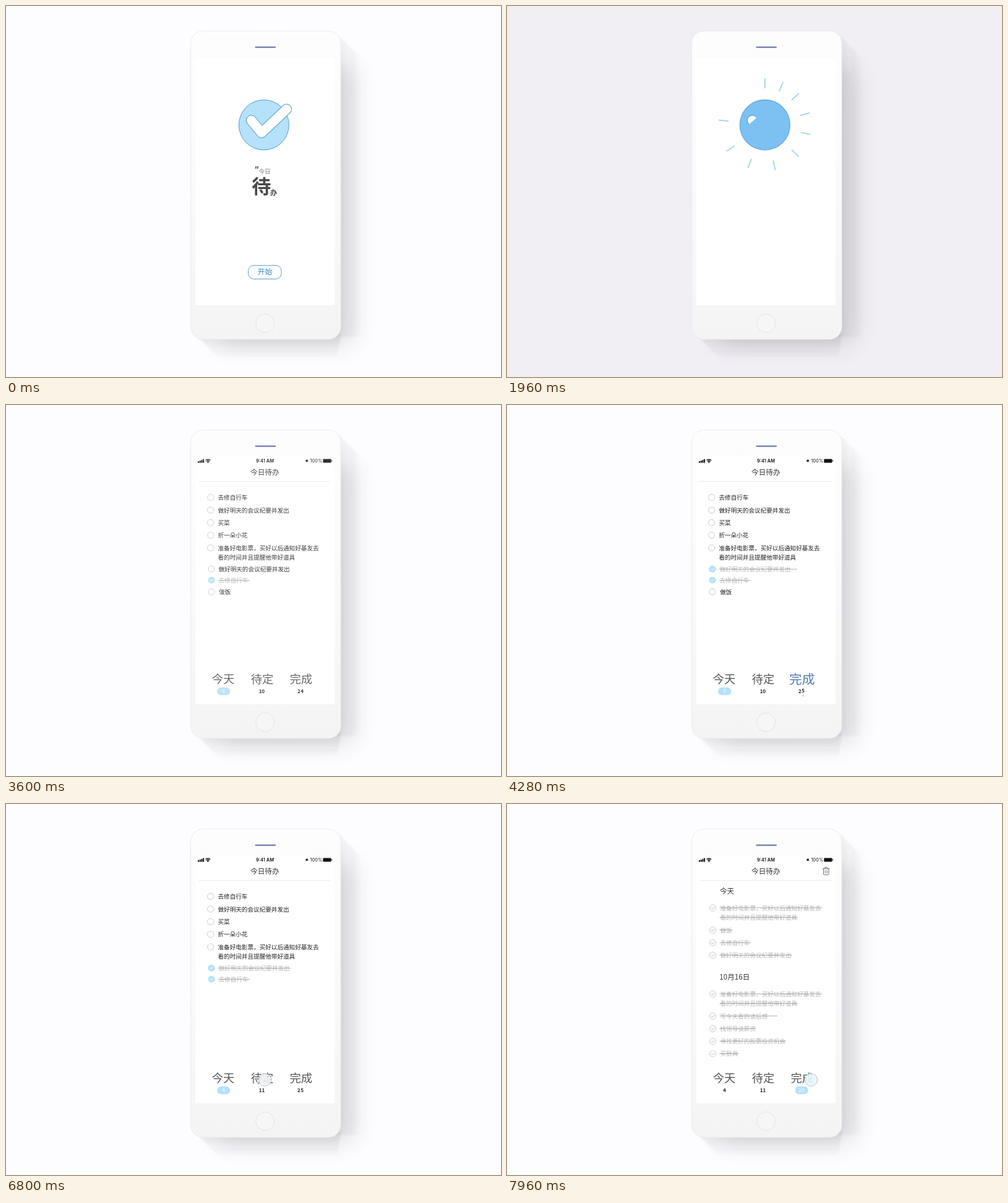
Animation of 800x600 px, one loop 8 s. Source, as an HTML page:

```html
<!DOCTYPE html>
<html lang="zh-CN">
<head>
<meta charset="utf-8">
<title>今日待办</title>
<style>
html, body { margin: 0; width: 100%; height: 100%; overflow: hidden; background: #fdfdff; }
svg { display: block; width: 800px; height: 600px; }
text { font-family: "Noto Sans CJK SC", "Noto Sans CJK", sans-serif; fill: #222; }
.num { font-family: Inter, sans-serif; font-weight: 600; font-size: 8px; letter-spacing: .4px; }
.status text { font-family: Inter, sans-serif; font-size: 7.4px; fill: #111; }
.mid { text-anchor: middle; }
.item { font-size: 9.6px; }
.head { font-size: 11.6px; fill: #333; }
.tab { font-size: 18.3px; font-weight: 300; fill: #555; text-anchor: middle; }
.ring { fill: #fff; stroke: #c8c8c8; }
.tick { fill: none; stroke-linecap: round; stroke-linejoin: round; }
.faint { fill: #b4b4b4; }
.strike { stroke: #999; stroke-width: .8; }

.anim, .anim * { animation: 8s linear infinite; }
.zoom { transform-box: fill-box; transform-origin: center; }

/* splash */
#tint { animation-name: tint; }
@keyframes tint { 0%, 9.5% { opacity: 0 } 20% { opacity: .5 } 24%, 25.5% { opacity: 1 } 30%, 100% { opacity: 0 } }
#splash { animation-name: splash; }
@keyframes splash { 0%, 41.5% { opacity: 1 } 44%, 100% { opacity: 0 } }
#badge { animation-name: badge; transform-origin: 416.8px 192.3px; }
@keyframes badge {
  0%, 9.5% { transform: none; animation-timing-function: ease-in }
  13%, 14% { transform: scale(0); animation-timing-function: ease-out }
  18.5% { transform: scale(1.05) } 19.5%, 100% { transform: none }
}
#disc { animation-name: disc; }
@keyframes disc { 0%, 12% { fill: #b5e1fb } 13%, 25% { fill: #7dc1f3 } 34%, 100% { fill: #b5e1fb } }
#reveal { stroke-dasharray: 100; animation-name: reveal; }
@keyframes reveal { 0%, 13% { stroke-dashoffset: 0 } 13.01%, 23% { stroke-dashoffset: 100 } 24.5% { stroke-dashoffset: 87 } 30%, 100% { stroke-dashoffset: 0 } }
#rays line { stroke-dasharray: 16 100; animation-name: ray; }
@keyframes ray { 0%, 20% { stroke-dashoffset: 17 } 24.5% { stroke-dashoffset: -14 } 28.5%, 100% { stroke-dashoffset: -47 } }
#name { animation-name: name; }
@keyframes name { 0%, 9.5% { opacity: 1 } 12.5%, 31% { opacity: 0 } 36%, 100% { opacity: 1 } }
#start { animation-name: start; }
@keyframes start { 0%, 9.5% { opacity: 1 } 12.5%, 34.5% { opacity: 0 } 40%, 100% { opacity: 1 } }

/* screens */
#app { animation-name: app; }
@keyframes app { 0%, 41.5% { opacity: 0 } 45.5%, 100% { opacity: 1 } }
#today { animation-name: today; }
@keyframes today { 0%, 85.3% { opacity: 1 } 88%, 100% { opacity: 0 } }
#later { animation-name: later; }
@keyframes later { 0%, 87.5% { opacity: 0 } 90.5%, 91.5% { opacity: 1 } 93.5%, 100% { opacity: 0 } }
#open { animation-name: open; }
@keyframes open { 0%, 91.5% { opacity: 1 } 93.5%, 100% { opacity: 0 } }
#done { animation-name: done; }
@keyframes done { 0%, 93% { opacity: 0 } 97%, 100% { opacity: 1 } }

/* checking an item */
#checkFill { animation-name: checkFill; }
@keyframes checkFill { 0%, 47.5% { opacity: 0 } 50%, 100% { opacity: 1 } }
#checkText { animation-name: checkText; }
@keyframes checkText { 0%, 48% { fill: #222 } 51%, 100% { fill: #b4b4b4 } }
#checkLine { transform-origin: 343px 0; animation-name: checkLine; }
@keyframes checkLine { 0%, 48.5% { transform: scaleX(0) } 53.5% { transform: scaleX(1.077) } 54.5%, 100% { transform: none } }
#tabDone { animation-name: tabDone; }
@keyframes tabDone { 0%, 50.5% { transform: none; fill: #555 } 53%, 53.5% { transform: scale(1.13); fill: #527bb8 } 54.5%, 100% { transform: none; fill: #555 } }
#tabLater { animation-name: tabLater; }
@keyframes tabLater { 0%, 73% { transform: none; fill: #555 } 75.5%, 76% { transform: scale(1.13); fill: #527bb8 } 77%, 100% { transform: none; fill: #555 } }

/* counters */
.flipA { animation-name: flipA; }
@keyframes flipA { 0%, 50.5% { transform: none } 53.5% { transform: translateY(7px) } 54.5%, 100% { transform: translateY(8px) } }
.flipB { animation-name: flipB; }
@keyframes flipB { 0%, 73% { transform: none } 76% { transform: translateY(7px) } 77%, 100% { transform: translateY(8px) } }
.fadeA { animation-name: fadeA; }
@keyframes fadeA { 0%, 50.5% { opacity: 1 } 53.5% { opacity: .2 } 54.5%, 100% { opacity: 0 } }
.fadeB { animation-name: fadeB; }
@keyframes fadeB { 0%, 73% { opacity: 1 } 76% { opacity: .2 } 77%, 100% { opacity: 0 } }
#pill { animation-name: pill; }
@keyframes pill { 0%, 85.3% { transform: none } 87.5%, 92% { transform: translateX(62px) } 94.5%, 100% { transform: translateX(124.5px) } }
#numToday text { fill: inherit; }
#numLater text { fill: inherit; }
#numDone text { fill: inherit; }
#numToday { animation-name: numToday; }
@keyframes numToday { 0%, 85.3% { fill: #eaf6fe } 87%, 100% { fill: #222 } }
#numLater { animation-name: numLater; }
@keyframes numLater { 0%, 85.8% { fill: #222 } 87.5%, 92% { fill: #eaf6fe } 93.5%, 100% { fill: #222 } }
#numDone { animation-name: numDone; }
@keyframes numDone { 0%, 92.5% { fill: #222 } 94.5%, 100% { fill: #eaf6fe } }

/* dragging */
.dragX { animation-name: dragX; }
@keyframes dragX { 0%, 64.5% { transform: none } 66.5% { transform: translateX(40.7px); animation-timing-function: ease-out } 70%, 100% { transform: translateX(60.5px) } }
.dragY { animation-name: dragY; }
@keyframes dragY { 0%, 64.5% { transform: none; animation-timing-function: ease-in } 66.5% { transform: translateY(39.7px); animation-timing-function: ease-out } 70%, 100% { transform: translateY(132.5px) } }
#held { transform-origin: 354px 302px; animation-name: held; }
@keyframes held { 0%, 60% { transform: none; opacity: 1 } 62%, 72% { transform: scale(1.77); opacity: 1 } 75%, 100% { transform: scale(.8); opacity: 0 } }
#heldRing { animation-name: heldRing; }
@keyframes heldRing { 0%, 72% { opacity: 1 } 76%, 100% { opacity: 0 } }
#finger { animation-name: finger; transform-origin: 366.5px 313.5px; }
@keyframes finger {
  0%, 56.4% { opacity: 0; transform: translate(-5.5px, -5.5px) scale(.57) }
  56.5%, 60% { opacity: 1; transform: translate(-5.5px, -5.5px) scale(.57) }
  62%, 72% { opacity: 1; transform: none } 77%, 100% { opacity: 0; transform: none }
}
#tap { animation-name: tap; }
@keyframes tap {
  0%, 80.8% { opacity: 0; transform: none; fill: #f0f3f3 }
  83%, 88% { opacity: .9; transform: none; fill: #f0f3f3; animation-timing-function: ease-in-out }
  91.5%, 100% { opacity: .9; transform: translateX(73px); fill: #e8f6fe }
}
</style>
</head>
<body>
<svg viewBox="0 0 800 600">
  <defs>
    <filter id="soft" x="-30%" y="-30%" width="160%" height="160%"><feGaussianBlur stdDeviation="19"/></filter>
    <filter id="edge"><feGaussianBlur stdDeviation="1.5"/></filter>
    <linearGradient id="cast" gradientUnits="userSpaceOnUse" x1="420" y1="290" x2="520" y2="390">
      <stop offset=".35" stop-color="#433b46" stop-opacity=".07"/>
      <stop offset="1" stop-color="#433b46" stop-opacity="0"/>
    </linearGradient>
    <linearGradient id="castR" gradientUnits="userSpaceOnUse" x1="541" y1="0" x2="575" y2="0">
      <stop offset="0" stop-color="#433b46" stop-opacity=".07"/>
      <stop offset="1" stop-color="#433b46" stop-opacity="0"/>
    </linearGradient>
    <linearGradient id="castB" gradientUnits="userSpaceOnUse" x1="0" y1="539" x2="0" y2="570">
      <stop offset="0" stop-color="#433b46" stop-opacity=".09"/>
      <stop offset="1" stop-color="#433b46" stop-opacity="0"/>
    </linearGradient>
    <linearGradient id="body" x1="0" y1="0" x2="0" y2="1">
      <stop offset="0" stop-color="#fdfdfd"/><stop offset=".5" stop-color="#fafafa"/><stop offset="1" stop-color="#f4f4f4"/>
    </linearGradient>
    <clipPath id="counter"><rect x="335" y="458.6" width="160" height="13.4"/></clipPath>
    <mask id="pen" maskUnits="userSpaceOnUse" x="370" y="145" width="110" height="80">
      <g class="anim"><path id="reveal" d="M388 175L413 204.5L464 157" pathLength="100" fill="none" stroke="#fff" stroke-width="26" stroke-linejoin="round"/></g>
    </mask>
  </defs>

  <rect width="800" height="600" fill="#fdfdff"/>
  <g class="anim"><rect id="tint" width="800" height="600" fill="#f1eff4"/></g>

  <rect x="340" y="95" width="222" height="452" rx="20" fill="#433b46" opacity=".17" filter="url(#soft)"/>
  <g filter="url(#edge)">
    <path d="M539 50L575 86V535H535Z" fill="url(#castR)"/>
    <path d="M311 536L345 570H535L541 530Z" fill="url(#castB)"/>
  </g>
  <rect x="298.5" y="40.5" width="242.5" height="498.5" rx="20" fill="url(#body)" stroke="#ebebec"/>
  <rect x="306" y="84" width="225" height="400" fill="#fff"/>
  <path d="M403.5 66.6H435" stroke="#7079ae" stroke-width="2.2" stroke-linecap="round"/>
  <circle cx="418.7" cy="513" r="15" fill="#f6f6f6" stroke="#e4e4e4"/>

  <g class="anim">
    <g id="splash">
      <g id="rays" stroke="#a5d4f2" stroke-width="1.9"></g>
      <g id="badge">
        <circle id="disc" cx="416.8" cy="192.3" r="40.5" fill="#b5e1fb" stroke="#4a9bd4"/>
        <g mask="url(#pen)" class="tick">
          <path d="M396.6 185L413.2 205L453.3 167" stroke="#4a9bd4" stroke-width="17.4"/>
          <path d="M396.6 185L413.2 205L453.3 167" stroke="#fff" stroke-width="15.4"/>
        </g>
      </g>
      <g id="name">
        <text x="401.5" y="269" font-size="13" font-weight="700" style="font-family:Inter,sans-serif;fill:#444">“</text>
        <text x="408.5" y="271.3" font-size="9.4" font-weight="300" style="fill:#777">今日</text>
        <text x="397.3" y="303" font-size="31" font-weight="700" style="fill:#484848">待</text>
        <text x="427" y="306.3" font-size="11" font-weight="700" style="fill:#484848">办</text>
      </g>
      <g id="start">
        <rect x="391.5" y="419.5" width="53.5" height="22" rx="9" fill="#fff" stroke="#5a9fd0"/>
        <text x="418.5" y="434.4" class="mid" font-size="11.8" style="fill:#3a87c2">开始</text>
      </g>
    </g>

    <g id="app">
      <g class="status">
        <path d="M311 93.4v-2.4M313.7 93.4v-3.4M316.4 93.4v-4.6M319.1 93.4v-6" stroke="#111" stroke-width="2"/>
        <path d="M322.6 89.6a5.4 5.4 0 0 1 7.6 0M324.1 91.4a3.3 3.3 0 0 1 4.6 0" fill="none" stroke="#111" stroke-width="1.4"/>
        <circle cx="326.4" cy="92.7" r="1.1"/>
        <text x="418.5" y="93" class="mid" font-weight="600">9:41 AM</text>
        <circle cx="486.2" cy="90.2" r="1.9" fill="#222"/>
        <text x="491.6" y="93">100%</text>
        <rect x="512.4" y="87.4" width="13" height="5.8" rx="1.2" fill="#111" stroke="#555" stroke-width=".6"/>
        <path d="M526.7 89.2v2.2" stroke="#333"/>
      </g>
      <text x="418.3" y="113" class="head mid">今日待办</text>
      <path d="M311 123.5H524" stroke="#ebebeb"/>

      <g id="open"></g>
      <g id="today">
        <g id="todayText"></g>
        <circle class="ring" cx="332" cy="265.2" r="5"/>
        <g id="checkFill"><use href="#bluetick" y="265.2"/></g>
        <text id="checkText" class="item" x="343.5" y="268.6">做好明天的会议纪要并发出</text>
        <path id="checkLine" class="strike" d="M343 265.4H460"/>
        <use href="#bluetick" y="283.2"/>
        <text class="item faint" x="343.5" y="286.8">去修自行车</text>
        <path class="strike" d="M343 283.6H394"/>
        <circle id="heldRing" class="ring" cx="332" cy="302.2" r="5.1"/>
      </g>
      <g id="later"></g>
      <g id="done">
        <path class="tick" d="M510.4 104.7H521M513.6 104.5V102.6H517.8V104.5M511.5 104.9V113.2Q511.5 114.5 512.8 114.5H518.6Q519.9 114.5 519.9 113.2V104.9M514.3 107.4V111.8M517.1 107.4V111.8" stroke="#6f6f78"/>
        <text class="head" x="344" y="145.2">今天</text>
        <text class="head" x="343.3" y="284.2">10月16日</text>
      </g>

      <text class="tab" x="351" y="450">今天</text>
      <text id="tabLater" class="tab zoom" x="414" y="450">待定</text>
      <text id="tabDone" class="tab zoom" x="476.7" y="450">完成</text>
      <rect id="pill" x="341.2" y="456.8" width="21" height="12.4" rx="6" fill="#b5e1fb"/>
      <g class="num" clip-path="url(#counter)">
        <g id="numToday"><g class="flipB"><g class="flipA">
          <text x="349.2" y="466" class="fadeA">6</text>
          <text x="349.2" y="458" class="fadeB">5</text>
          <text x="349.2" y="450">4</text>
        </g></g></g>
        <g id="numLater">
          <text x="408.8" y="466">1</text>
          <g class="flipB"><text x="413.3" y="466" class="fadeB">0</text><text x="413.6" y="458">1</text></g>
        </g>
        <g id="numDone">
          <text x="471" y="466">2</text>
          <g class="flipA"><text x="476.3" y="466" class="fadeA">4</text><text x="476.3" y="458">5</text></g>
        </g>
      </g>

      <g class="dragX"><g class="dragY">
        <text id="held" class="item" x="344.2" y="305.7">做饭</text>
        <circle id="finger" cx="366.5" cy="313.5" r="9.9" fill="#f2f2f2" stroke="#b6b6b6" stroke-width="1.5"/>
      </g></g>
      <circle id="tap" cx="418.4" cy="446" r="10.3" fill="#f0f3f3" stroke="#b4bcc0"/>
    </g>
  </g>

  <defs>
    <g id="bluetick">
      <circle cx="332" r="5.5" fill="#b5e1fb"/>
      <path class="tick" d="M329.5 0L331.4 1.8L334.6 -1.5" stroke="#fff"/>
    </g>
    <g id="graytick">
      <circle cx="332.6" r="5.2" fill="#fff" stroke="#c4c4c4" stroke-width=".9"/>
      <path class="tick" d="M330 0L332 1.9L335.3 -1.6" stroke="#b0b0b0" stroke-width=".9"/>
    </g>
  </defs>
</svg>
<script>
const add = (id, markup) => document.getElementById(id).insertAdjacentHTML('beforeend', markup);
const label = (x, y, s, cls = '') => `<text class="item ${cls}" x="${x}" y="${y + 3.6}">${s}</text>`;

[0, 23, 47, 75, 102, 133, 167, 201.5, 235.5, 276].forEach(a =>
  add('rays', `<line x1="416.8" y1="147.3" x2="416.8" y2="101.3" transform="rotate(${a} 416.8 192.3)"/>`));

const film = ['准备好电影票，买好以后通知好基友去', '看的时间并且提醒他带好道具'];
const ys = [149.5, 169.9, 190.2, 210.7, 231];
ys.forEach(y => add('open', `<circle class="ring" cx="330.7" cy="${y}" r="5.1"/>`));
['去修自行车', '做好明天的会议纪要并发出', '买菜', '折一朵小花', film[0]].forEach((s, i) =>
  add('todayText', label(342.5, ys[i], s)));
add('todayText', label(342.5, 246.3, film[1]));
['做饭', '写今天看的读后感', '找领导谈薪资', '寻找更好的股票投资机会', '买厨具'].forEach((s, i) =>
  add('later', label(342.5, ys[i], s)));

// centre y, text, strike end, has a tick
const finished = [
  [168, film[0], 509, 1], [183.5, film[1], 470, 0], [204, '做饭', 365, 1],
  [224.4, '去修自行车', 394, 1], [244.7, '做好明天的会议纪要并发出', 461, 1],
  [307.2, film[0], 509, 1], [322.7, film[1], 470, 0], [343, '写今天看的读后感', 437, 1],
  [363.4, '找领导谈薪资', 402, 1], [383.8, '寻找更好的股票投资机会', 451, 1], [403.8, '买厨具', 375, 1]
];
for (const [y, s, end, tick] of finished) {
  add('done', (tick ? `<use href="#graytick" y="${y}"/>` : '') + label(344.5, y, s, 'faint') +
    `<path class="strike" d="M343.5 ${y - .2}H${end}"/>`);
}
</script>
</body>
</html>
```
